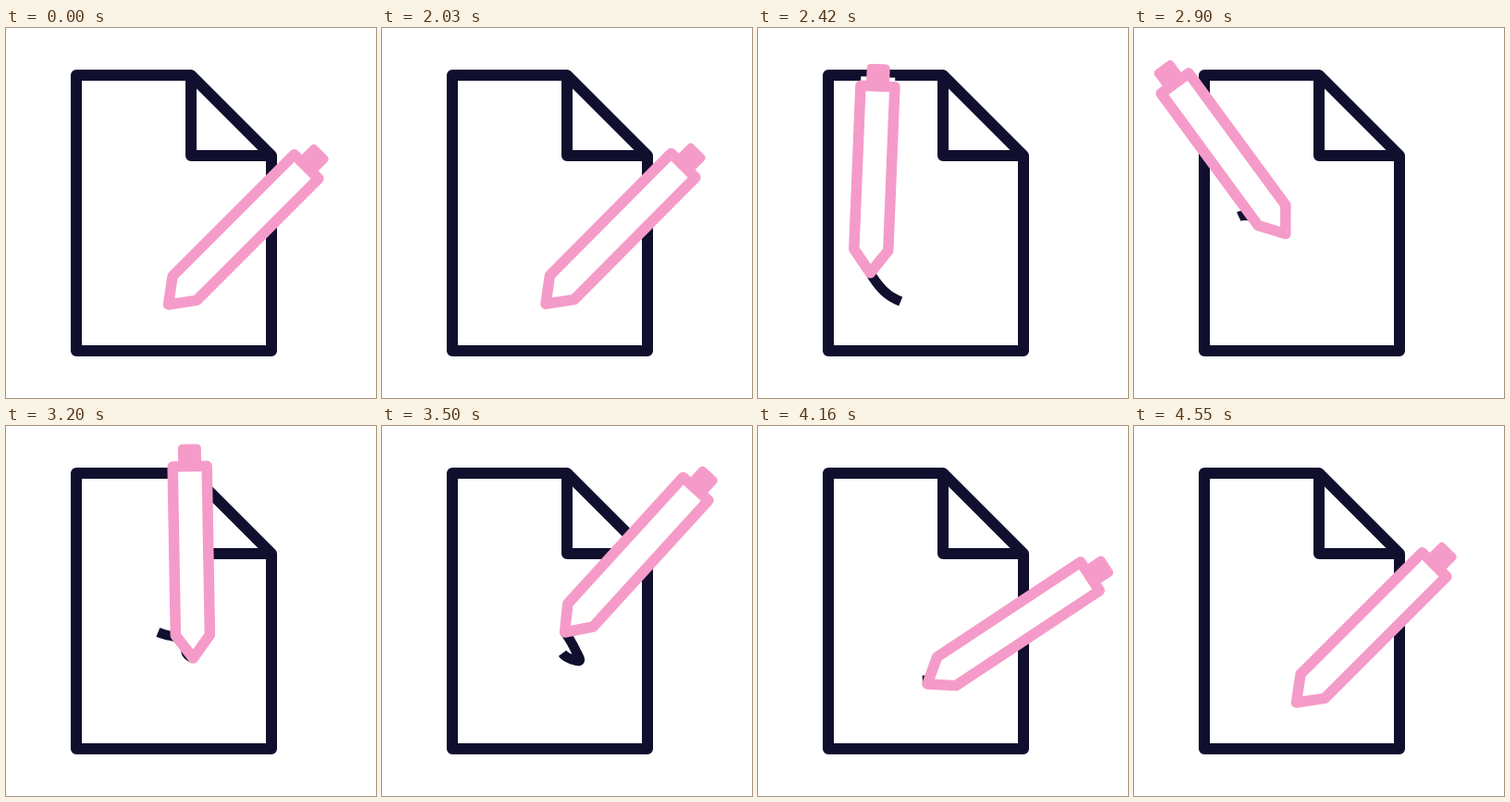
Recreate the animation shown at these times as an HTML page. Size 400 by 400 pixels, loop 4.58 s.

```html
<!DOCTYPE html>
<html lang="en">
<head>
<meta charset="utf-8">
<title>Writing pen</title>
<style>
  html, body { margin: 0; width: 100%; height: 100%; overflow: hidden; background: #fff; }
  svg { display: block; width: 100vw; height: 100vh; }
</style>
</head>
<body>
<svg viewBox="0 0 400 400" fill="none" stroke-linejoin="round" stroke-linecap="round">
  <g stroke="#100f2e" stroke-width="12">
    <path d="M200 51H76V349H287V138L200 51V138H287"/>
    <path id="ink" stroke-width="10.5" stroke-linecap="butt"/>
  </g>
  <g id="pen">
    <rect id="gap" x="-18.5" width="37" height="12" fill="#fff"/>
    <path id="body" fill="#fff" stroke="#f59bc9" stroke-width="11.5"/>
    <rect id="cap" x="-12.5" width="25" height="26" rx="4.5" fill="#f59bc9"/>
  </g>
</svg>
<script>
const LOOP = 4580, START = 2030, STEP = 30;

// time, tip x, tip y, lean in degrees
const pose = [
  [2000, 175.5, 299, 45],
  [2030, 177, 298.3, 44.8],
  [2120, 174, 299, 40],
  [2220, 158, 297, 31],
  [2320, 138, 286, 17],
  [2420, 121.3, 264.8, 2.3],
  [2540, 108, 234, -15],
  [2670, 112, 205, -24],
  [2780, 135, 206, -32],
  [2900, 163.8, 222.6, -36.3],
  [3080, 192, 232, -22],
  [3160, 196, 247, -9],
  [3270, 213, 254, 13],
  [3380, 210, 244, 29],
  [3500, 197.6, 223, 42.4],
  [3620, 180, 206, 51.5],
  [3760, 168, 189, 58],
  [3890, 172.7, 211.7, 60.8],
  [4160, 183, 279, 56.5],
  [4300, 168, 295, 50],
  [4550, 175.5, 299, 45]
];
// time, barrel length
const barrel = [[2030, 186], [2420, 177], [2670, 161], [2900, 177], [3500, 185], [3890, 186]];
// time, age of the oldest visible ink
const age = [[2030, 0], [2420, 180], [2900, 220], [3500, 350], [3640, 220], [3890, 130], [4300, 0]];

const [ink, pen, body, cap, gap] =
  ["ink", "pen", "body", "cap", "gap"].map(id => document.getElementById(id));

function slope(rows, i, c) {
  const a = rows[Math.max(i - 1, 0)], b = rows[Math.min(i + 1, rows.length - 1)];
  return (b[c] - a[c]) / (b[0] - a[0]);
}

// Cubic Hermite curve through the rows
function value(rows, t, c = 1) {
  const last = rows.length - 1;
  if (t <= rows[0][0]) return rows[0][c];
  if (t >= rows[last][0]) return rows[last][c];
  let i = 0;
  while (rows[i + 1][0] <= t) i++;
  const a = rows[i], b = rows[i + 1], h = b[0] - a[0];
  const u = (t - a[0]) / h, v = 1 - u;
  return a[c] * v * v * (1 + 2 * u) + b[c] * u * u * (3 - 2 * u)
    + h * u * v * (slope(rows, i, c) * v - slope(rows, i + 1, c) * u);
}

function trail(t) {
  const span = value(age, t);
  if (span < 5) return "";
  const pts = [];
  for (let k = 0; k <= 24; k++) {
    const s = t - span * (1 - k / 24);
    pts.push(value(pose, s, 1).toFixed(2) + " " + value(pose, s, 2).toFixed(2));
  }
  return "M" + pts.join("L");
}

function draw(ms) {
  const now = ms % LOOP;
  const t = now < START ? 0 : START + Math.floor((now - START) / STEP) * STEP;
  const top = -25 - value(barrel, t);
  const [x, y, lean] = [1, 2, 3].map(c => value(pose, t, c));
  pen.setAttribute("transform", `translate(${x} ${y}) rotate(${lean})`);
  body.setAttribute("d", `M0 0L-18.5 -25V${top}H18.5V-25Z`);
  cap.setAttribute("y", top - 24);
  gap.setAttribute("y", top - 10);
  ink.setAttribute("d", trail(t));
}

const begin = performance.now();
function tick() {
  draw(performance.now() - begin);
  requestAnimationFrame(tick);
}
tick();
</script>
</body>
</html>
```
